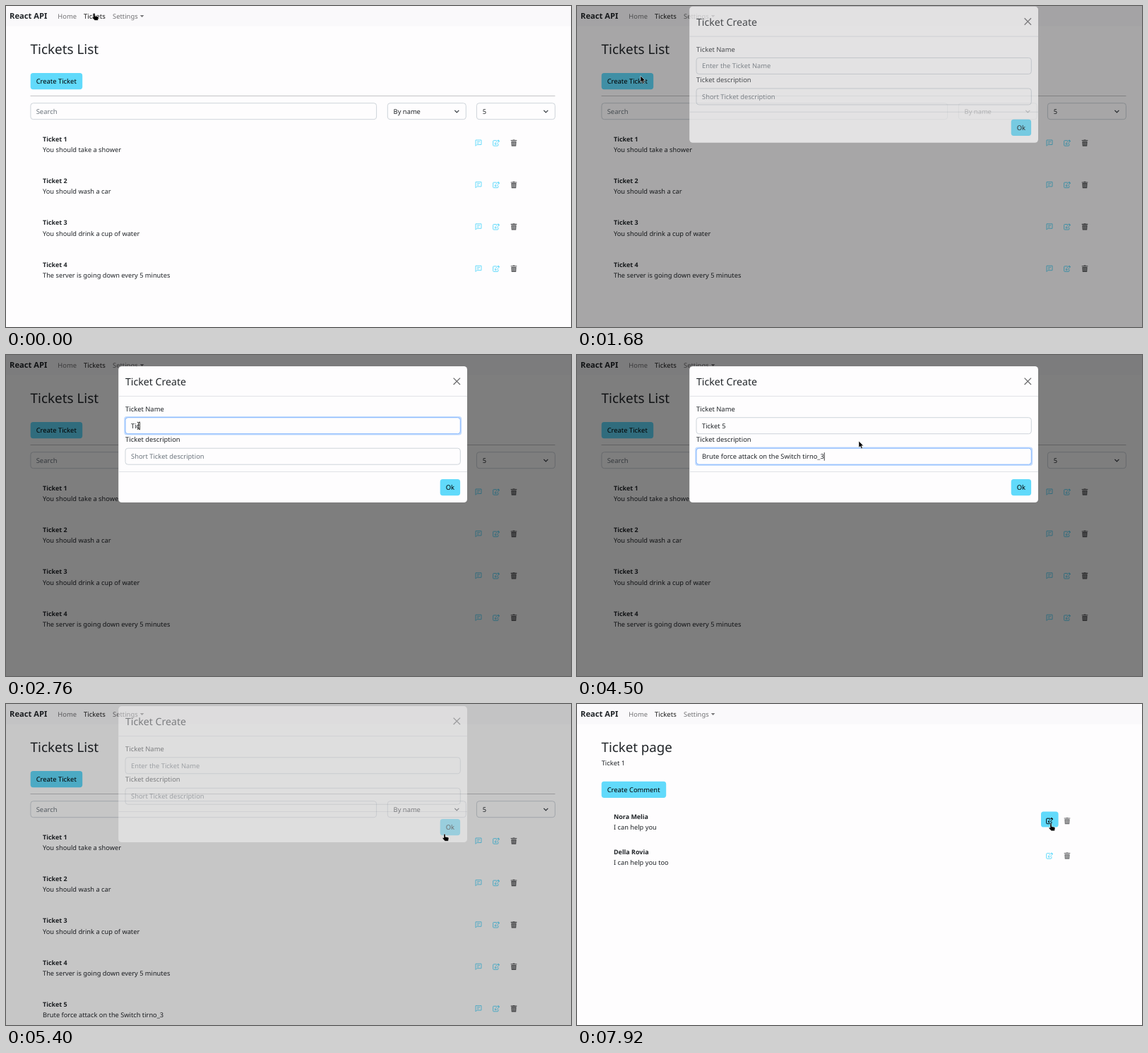
An HTML page that plays this animation: 800 by 455 pixels, repeating every 8 s.

```html
<!DOCTYPE html>
<html lang="en">
<head>
<meta charset="utf-8">
<title>Tickets</title>
<style>
html, body { margin: 0; width: 100%; height: 100%; overflow: hidden; background: #fefdfe; }
svg { display: block; width: 100vw; height: 100vh; font-family: "Noto Sans", "Open Sans", sans-serif; text-rendering: geometricPrecision; }
text { white-space: pre; }
</style>
</head>
<body>
<svg id="stage" viewBox="0 0 800 455"></svg>
<script>
const LOOP = 8000, STEP = 60, LAST = 7920;
const INK = '#212529', CYAN = '#61dafb', PAPER = '#fefdfe', MUTED = '#6c757d', GREY = '#5a5b5d';
const OPEN = 1628, CLOSE = 5358, PAGE = 6540, HOVER_CHAT = 6225, HOVER_EDIT = 7690;
const NAME = 'Ticket 5', NOTE = 'Brute force attack on the Switch tirno_3';
const stage = document.getElementById('stage');
const $ = id => document.getElementById(id);
const clamp = v => Math.max(0, Math.min(1, v));

// Text is placed by the vertical centre of its capitals.
const text = (x, mid, size, str, fill = INK, extra = '') =>
  `<text x="${x}" y="${(mid + size * 0.365).toFixed(2)}" font-size="${size}" fill="${fill}" ${extra}>${str}</text>`;
const bold = (x, mid, size, str) => text(x, mid, size, str, INK, 'font-weight="700"');
const box = (x, y, w, h, fill, stroke = 'none', extra = '') =>
  `<rect x="${x}" y="${y}" width="${w}" height="${h}" rx="3.7" fill="${fill}" stroke="${stroke}" ${extra}/>`;
const line = (x1, x2, y, color) => `<path d="M${x1} ${y}H${x2}" stroke="${color}"/>`;
const at = (x, y, inner, extra = '') => `<g transform="translate(${x} ${y})" ${extra}>${inner}</g>`;
const button = (x, y, w, label) => box(x, y, w, 23.2, CYAN) + text(x + 8, y + 11.6, 9.4, label, '#000');

const icons = {
  chat: `<path d="M-4 -4H4V2.5H-2.2L-4 4.3Z M-2.1 -1.8H2.1M-2.1 .4H.5" fill="none" stroke="currentColor" stroke-width=".95"/>`,
  edit: `<path d="M.8 -3.3H-3.5a.8 .8 0 0 0 -.8 .8V3.4a.8 .8 0 0 0 .8 .8H2.1a.8 .8 0 0 0 .8 -.8V1.2" fill="none" stroke="currentColor"/>
    <path d="M-1.6 2L-1.3 .2 2.8 -3.9 4.5 -2.2 .4 1.8Z" fill="none" stroke="currentColor" stroke-width=".9"/>
    <path d="M-1.9 2.3L-1.6 .2 .3 2ZM2 -3.2L3.1 -4.4 5 -2.5 3.8 -1.4Z" fill="currentColor"/>`,
  trash: `<path d="M-1.4 -4.6H1.4V-4H4.3V-2.9H-4.3V-4H-1.4ZM-3.6 -2.3H3.6L3.2 4.8H-3.2Z" fill="currentColor"/>
    <path d="M-1.7 -1.2V3.6M0 -1.2V3.6M1.7 -1.2V3.6" stroke="${PAPER}" stroke-width=".5"/>`
};
const icon = (kind, x, y, color, id = '') => at(x, y, icons[kind], `color="${color}" id="${id}"`);

const tickets = ['You should take a shower', 'You should wash a car', 'You should drink a cup of water',
  'The server is going down every 5 minutes', NOTE];

const ticketRow = (note, i) => {
  const y = 194 + i * 59.4;
  return `<g id="row${i}">` + bold(52, y - 5.6, 8.95, 'Ticket ' + (i + 1)) + text(52, y + 9.4, 9.25, note) +
    icon('chat', 669, y, CYAN, 'chat' + i) + icon('edit', 694, y, CYAN) + icon('trash', 719, y, GREY) + '</g>';
};
const commentRow = (who, note, i) => {
  const y = 165.5 + i * 49.5;
  return bold(52, y - 5.6, 8.95, who) + text(52, y + 9.4, 9.25, note) +
    icon('edit', 669, y, CYAN, 'edit' + i) + icon('trash', 694, y, '#707173');
};
const select = (x, label) => box(x, 137.7, 111, 23, PAPER, '#ced4da') + text(x + 8.3, 149.3, 9.35, label) +
  at(x + 98, 149.3, '<path d="M-3 -1.5L0 1.5 3 -1.5" fill="none" stroke="#343a40" stroke-width="1.2"/>');
const field = (id, y) =>
  box(167.2, y - 1.8, 478, 26.6, '#c2dbfe', 'none', `id="${id}Ring"`) +
  box(169, y, 474.3, 23, PAPER, '#ced4da', `id="${id}Box"`) +
  text(177, y + 11.6, 9.35, '', INK, `id="${id}"`) +
  `<path id="${id}Caret" d="M0 ${y + 6}v11.5" stroke="#111" stroke-width=".8"/>`;

const navbar = `<rect width="800" height="28.5" fill="#faf9fb"/>` + bold(5, 14.3, 11.2, 'React API') +
  text(73.3, 14.2, 9.4, 'Home', '#737375') + text(110, 14.2, 9.5, 'Tickets', '#1a1a1a') +
  text(151, 14.2, 9.4, 'Settings', '#737375') + '<path d="M189.8 13h5.6l-2.8 2.9z" fill="#737375"/>';

const listPage = text(34.5, 61, 18.9, 'Tickets List') + button(34.7, 95, 73.5, 'Create Ticket') +
  line(34.5, 777.5, 127.5, '#c4c4c6') + box(34.9, 137.7, 489.7, 23, PAPER, '#ced4da') +
  text(42.7, 149.3, 9.45, 'Search', MUTED) + select(540.3, 'By name') + select(666.4, '5') +
  box(657, 181.2, 24.6, 22, CYAN, 'none', 'id="chatHover"') + tickets.map(ticketRow).join('');

const ticketPage = text(34.5, 61, 18.7, 'Ticket page') + text(34.7, 84, 9.3, 'Ticket 1') +
  button(34.7, 109.8, 91.5, 'Create Comment') + box(657, 152.4, 24.6, 22.2, CYAN, 'none', 'id="editHover"') +
  commentRow('Nora Melia', 'I can help you', 0) + commentRow('Della Rovia', 'I can help you too', 1);

const modal = `<rect x="159.2" y="16" width="493.8" height="193" rx="4.6" fill="${PAPER}"/>` +
  text(169, 37.7, 14.15, 'Ticket Create') +
  '<path d="M633.6 32.6l9.4 9.4m0 -9.4l-9.4 9.4" stroke="#6a6a6c" stroke-width="1.3"/>' +
  line(159.2, 653, 58.4, '#e0e2e6') + text(169, 76.5, 9.4, 'Ticket Name') + field('name', 88.7) +
  text(169, 120, 9.4, 'Ticket description') + field('note', 132.2) +
  line(159.2, 653, 165.5, '#e0e2e6') + button(614.7, 176, 28.4, 'Ok');

const pointers = {
  arrow: '<path d="M0 0V9.2L2.1 7.3 3.7 10.8 5.3 10.1 3.8 6.7H6.6Z" fill="#000" stroke="#fff" stroke-width=".5"/>',
  hand: '<path d="M-1 .8q0 -1 1 -1t1 1V3.7l3.7 .7q1.4 .3 1.2 1.8L5.2 9.8H.6L-2.5 6.4q-.6 -.9 .3 -1.3t1.2 .5Z" fill="#000" stroke="#fff" stroke-width=".4"/>',
  beam: '<path d="M-1.7 -4.8q1.7 0 1.7 1.2V4.2q0 1.2 -1.7 1.2M1.7 -4.8Q0 -4.8 0 -3.6M0 4.2q0 1.2 1.7 1.2" fill="none" stroke="#222" stroke-width="1"/>'
};

stage.innerHTML = `<rect width="800" height="455" fill="${PAPER}"/>` + navbar +
  `<g id="listPage">${listPage}</g><g id="ticketPage">${ticketPage}</g>` +
  `<rect id="shade" width="800" height="455"/><g id="modal">${modal}</g>` +
  '<g id="pointer">' + Object.keys(pointers).map(k => `<g id="${k}">${pointers[k]}</g>`).join('') + '</g>';

const track = [[0, 125, 10.5], [180, 125, 10.5], [1080, 90, 99], [1800, 90, 99], [2400, 187.5, 100],
  [3180, 187.5, 100], [3480, 399, 122], [4560, 399, 122], [5160, 621, 184.5], [5580, 621, 184.5],
  [6240, 668, 191], [7440, 668, 191], [7860, 671, 170], [LOOP, 671, 170]];
const shapes = [[0, 'hand'], [300, 'arrow'], [960, 'hand'], [OPEN, 'arrow'], [2100, 'beam'], [3240, 'arrow'],
  [5100, 'hand'], [5640, 'arrow'], [HOVER_CHAT, 'hand'], [PAGE, 'arrow'], [HOVER_EDIT, 'hand']];

const show = (id, on) => $(id).setAttribute('visibility', on ? 'visible' : 'hidden');
const display = (id, on) => { $(id).style.display = on ? '' : 'none'; };
const easeOut = x => 1 - Math.pow(1 - x, 1.655);

function drawPointer(t) {
  const i = track.findIndex((p, k) => k && t < p[0]);
  const [t0, x0, y0] = track[i - 1], [t1, x1, y1] = track[i];
  const p = (t - t0) / (t1 - t0), e = p * p * (3 - 2 * p);
  $('pointer').setAttribute('transform', `translate(${x0 + (x1 - x0) * e} ${y0 + (y1 - y0) * e})`);
  const shape = shapes.filter(s => s[0] <= t).pop()[1];
  for (const k in pointers) display(k, k === shape);
}

function drawField(id, value, hint, focused) {
  const el = $(id);
  el.textContent = value || hint;
  el.setAttribute('fill', value ? INK : MUTED);
  $(id + 'Box').setAttribute('stroke', focused ? '#86b7fe' : '#ced4da');
  display(id + 'Ring', focused);
  display(id + 'Caret', focused);
  const width = value ? el.getComputedTextLength() : 0;
  $(id + 'Caret').setAttribute('transform', `translate(${177.4 + width} 0)`);
}

function drawModal(t) {
  // The dialog's 150 ms fade and 300 ms slide run at double speed.
  const closing = t >= CLOSE, ms = 2 * (t - (closing ? CLOSE : OPEN));
  const fade = clamp(ms / 150), slide = easeOut(clamp(ms / 300));
  const alpha = closing ? 1 - fade : fade;
  const shift = -30.9 * (closing ? slide : 1 - slide);
  display('modal', alpha > 0);
  $('shade').setAttribute('opacity', alpha / 2);
  $('modal').setAttribute('opacity', alpha);
  $('modal').setAttribute('transform', `translate(0 ${shift})`);
  if (alpha <= 0) return;
  const typed = t < 3120 ? Math.min(6, Math.floor((t - 2580) / 60)) : Math.floor((t - 2700) / 60);
  const written = Math.floor((t - 3480) / 25);
  drawField('name', closing ? '' : NAME.slice(0, Math.max(0, typed)), 'Enter the Ticket Name', t >= 2520 && t < 3420);
  drawField('note', closing ? '' : NOTE.slice(0, Math.max(0, written)), 'Short Ticket description', t >= 3420 && !closing);
}

function drawHover(rect, glyph, amount) {
  $(rect).setAttribute('opacity', amount);
  $(glyph).setAttribute('color', amount > 0.5 ? '#000' : CYAN);
}

function render(time) {
  const t = Math.min(LAST, Math.floor((time % LOOP) / STEP) * STEP);
  display('listPage', t < PAGE);
  display('ticketPage', t >= PAGE);
  show('row4', t >= CLOSE);
  drawHover('chatHover', 'chat0', clamp((t - HOVER_CHAT) / 75));
  drawHover('editHover', 'edit0', clamp((t - HOVER_EDIT) / 75));
  drawModal(t);
  drawPointer(t);
}

const start = performance.now();
function tick() {
  render(performance.now() - start);
  requestAnimationFrame(tick);
}
tick();
</script>
</body>
</html>
```
